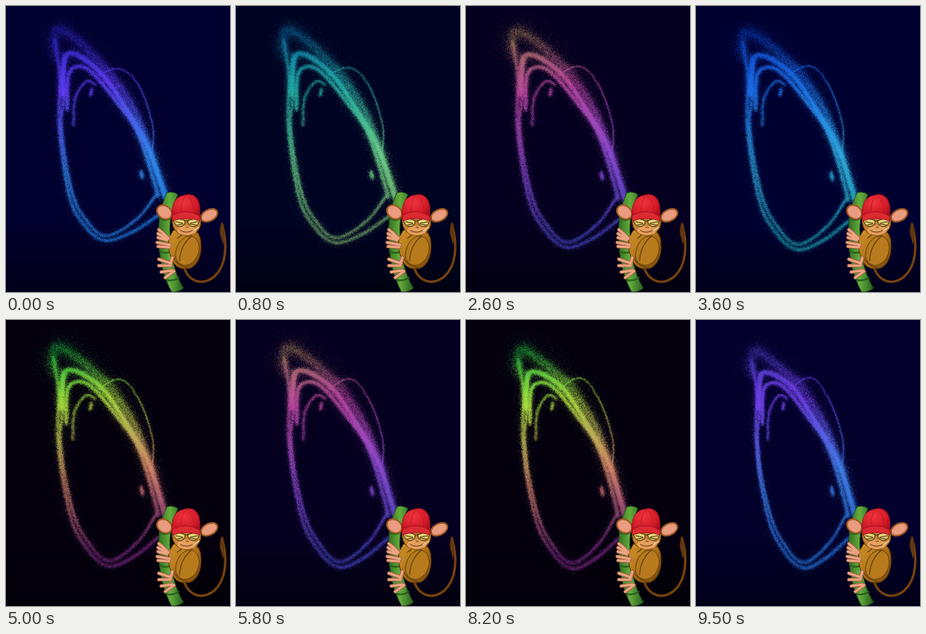
An HTML page with a canvas for the animation above (9600 ms loop, 280 by 358 pixels).

```html
<!DOCTYPE html>
<html lang="en">
<head>
<meta charset="utf-8">
<title>Attractor</title>
<style>
html, body { margin: 0; width: 100%; height: 100%; overflow: hidden; background: #02002c; }
canvas, svg { position: absolute; left: 0; top: 0; width: 280px; height: 358px; display: block; }
</style>
</head>
<body>
<canvas id="stage" width="280" height="358"></canvas>
<svg viewBox="0 0 280 358" stroke-linejoin="round" stroke-linecap="round">
  <defs>
    <linearGradient id="fur" x2="1" y2="1"><stop stop-color="#d39a2c"/><stop offset=".55" stop-color="#aa6c14"/><stop offset="1" stop-color="#70420b"/></linearGradient>
    <linearGradient id="cane"><stop stop-color="#326f20"/><stop offset=".45" stop-color="#65ad3d"/><stop offset="1" stop-color="#235b1c"/></linearGradient>
    <radialGradient id="cap" cx=".4" cy=".3" r=".75"><stop stop-color="#ee343d"/><stop offset=".65" stop-color="#d41b29"/><stop offset="1" stop-color="#a30c1b"/></radialGradient>
    <path id="hands" d="M203 291L196 284L191 280M201 291L190 285M201 293L190 290M205 299L189 296M204 302L190 301M208 315L206 322L191 317M206 325L191 325M208 331L194 333M210 332L199 340"/>
  </defs>
  <path d="M223 329C230 346 246 350 260 339C276 325 277 298 270 273" fill="none" stroke="#77430f" stroke-width="3"/>
  <path d="M270 270Q265 282 269 290L271 299Q276 286 270 270Z" fill="#623711"/>
  <path d="M201 234Q208 231 215 236C207 254 204 269 205 286C205 314 213 340 222 353Q217 358 207 358C197 340 191 316 191 289C190 270 193 251 201 234Z" fill="url(#cane)" stroke="#1b4616" stroke-width=".8"/>
  <path d="M192 266Q199 270 206 266M192 307Q199 311 207 307M201 343Q209 345 216 340" fill="none" stroke="#275c1a" stroke-width="2"/>
  <path d="M209 281C201 292 202 307 208 318C211 328 222 331 231 328C242 323 246 307 243 291Q240 279 228 279Z" fill="url(#fur)" stroke="#55310a"/>
  <path d="M212 315C211 299 221 287 232 288C243 291 244 307 237 317C229 327 217 328 212 315Z" fill="#b77b1d" stroke="#684009"/>
  <path d="M232 288Q218 299 217 319M221 285Q213 294 203 292M208 313Q214 326 229 328" fill="none" stroke="#64400d" stroke-width="1.2"/>
  <path d="M216 286Q213 296 204 294L203 288Q210 287 213 281Z" fill="#c38526"/>
  <use href="#hands" fill="none" stroke="#96503b" stroke-width="4.6"/>
  <use href="#hands" fill="none" stroke="#eba481" stroke-width="3.2"/>
  <g fill="#e99c80" stroke="#a05a24" stroke-width="2">
    <ellipse cx="198" cy="258" rx="10" ry="8" transform="rotate(35 198 258)"/>
    <ellipse cx="254" cy="262" rx="11" ry="7" transform="rotate(-28 254 262)"/>
  </g>
  <path d="M208 264Q206 278 215 284Q227 291 238 283Q246 276 243 263Z" fill="#c68230" stroke="#643b10"/>
  <ellipse cx="226" cy="281" rx="12" ry="6" fill="#e5a05b"/>
  <path d="M218 281Q226 286 235 280M225 277L228 277" fill="none" stroke="#68351c"/>
  <path d="M234 281L241 277" stroke="#e8ddb3" stroke-width="1.4"/>
  <path d="M209 267Q217 265 224 269Q224 276 217 276Q211 276 209 267ZM227 269Q235 265 242 267Q241 276 234 276Q228 276 227 269Z" fill="#e5d677" stroke="#40270c"/>
  <path d="M212 270L221 272M214 274L221 273M230 272L240 270M230 273L238 274M224 269L227 269" stroke="#56370f" stroke-width="1.2"/>
  <path d="M208 266C206 249 211 239 222 237Q234 233 240 243Q244 251 242 267Q225 259 208 266Z" fill="url(#cap)" stroke="#8e101a" stroke-width=".7"/>
  <path d="M208 262Q225 252 242 263L242 269Q226 263 208 269Z" fill="#dc2932" stroke="#9c101c" stroke-width=".8"/>
  <path d="M225 237Q218 245 219 257M226 237Q235 244 235 258" fill="none" stroke="#b91621" stroke-width=".7"/>
  <circle id="glint" cx="206" cy="284" r="2.8" fill="#28c4dc"/>
</svg>
<script>
const W = 280, H = 358, LOOP = 9600, CYCLE = 3200;
const ctx = document.getElementById('stage').getContext('2d');
const glint = document.getElementById('glint');
const image = ctx.createImageData(W, H);
const density = new Float32Array(W * H);
const clamp = (v, lo = 0, hi = 1) => Math.max(lo, Math.min(hi, v));
const mix = (a, b, k) => a + (b - a) * k;

let seed = 7321;
function random() {
  seed = (Math.imul(seed, 1664525) + 1013904223) >>> 0;
  return seed / 4294967296;
}
const gauss = () => Math.sqrt(-2 * Math.log(random() + 1e-9)) * Math.cos(2 * Math.PI * random());

function spline(p, u) {
  const last = p.length / 2 - 1, i = Math.min(last - 1, Math.floor(u * last)), f = u * last - i;
  const at = (n, axis) => p[2 * clamp(n, 0, last) + axis];
  return [0, 1].map(axis => {
    const a = at(i - 1, axis), b = at(i, axis), c = at(i + 1, axis), d = at(i + 2, axis);
    return b + .5 * f * (c - a + f * (2 * a - 5 * b + 4 * c - d + f * (3 * (b - c) + d - a)));
  });
}

// Scatter particles evenly along a curve; the spread changes from end to end.
const clouds = [];
function strand(count, spread0, spread1, ...points) {
  const track = [], lengths = [0], steps = 400;
  for (let i = 0; i <= steps; i++) {
    track.push(spline(points, i / steps));
    if (i) lengths.push(lengths[i - 1] + Math.hypot(track[i][0] - track[i - 1][0], track[i][1] - track[i - 1][1]));
  }
  const even = [];
  for (let i = 0, j = 0; i <= 1000; i++) {
    while (j < steps && lengths[j] < lengths[steps] * i / 1000) j++;
    even.push(track[j]);
  }
  const cloud = new Float32Array(count * 2);
  for (let i = 0; i < count; i++) {
    const u = random(), k = u * 1000, n = Math.min(999, Math.floor(k));
    const spread = mix(spread0, spread1, u) * (random() < .2 ? 2.5 : 1);
    for (let axis = 0; axis < 2; axis++)
      cloud[2 * i + axis] = mix(even[n][axis], even[n + 1][axis], k - n) + gauss() * spread;
  }
  clouds.push(cloud);
}

// Left loop
strand(20000, 1.6, 1.4, 60,40, 67,90, 66,150, 78,235, 96,272, 122,293, 158,282, 192,260);
strand(17000, 1.5, 1.3, 72,60, 72,110, 69,155, 82,232, 101,269, 125,287, 162,267, 188,235);
// Folds and the haze above them
strand(43000, 2.1, 1.8, 70,112, 71,78, 77,59, 98,66, 126,93, 152,132, 176,175, 199,240);
strand(22000, 1.5, 1.6, 76,130, 78,85, 93,75, 112,88, 138,120, 165,160, 190,238);
strand(2600, 1.5, 1.1, 84,150, 86,115, 100,94, 112,99);
strand(27000, 5, 2.2, 62,62, 60,36, 70,29, 105,58, 158,127, 200,238);
// Thin arc and the two bright spots
strand(3000, .8, .7, 112,88, 140,78, 165,98, 183,150, 181,190);
strand(900, 1.6, 1.8, 168,206, 170,215);
strand(550, 1.4, 1.4, 107,103, 105,112);

// Phase, background, then colours from the head to the foot of the shape.
const tone = (phase, ...names) => [phase, names.map(h => [1, 3, 5].map(i => parseInt(h.slice(i, i + 2), 16)))];
const palette = [
  tone(0, '#02002e', '#2c26c4', '#6440ff', '#328aee', '#1e78d8'),
  tone(.11, '#000032', '#0c3cc8', '#1c70ff', '#2aa8ec', '#10a0b4'),
  tone(.3, '#00041c', '#0c8c9c', '#28d090', '#84e064', '#8c9c44'),
  tone(.5, '#04000f', '#1cb444', '#9cf03c', '#e8b45c', '#8a3478'),
  tone(.57, '#04000e', '#1cb83c', '#b4e840', '#d88070', '#70247c'),
  tone(.78, '#06001c', '#b48a40', '#d84c98', '#9a40d0', '#4838ba')
];
palette.push([1, palette[0][1]]);

function coloursAt(phase) {
  const i = palette.findIndex((key, n) => n && phase <= key[0]);
  const [p0, a] = palette[i - 1], [p1, b] = palette[i], k = (phase - p0) / (p1 - p0);
  return a.map((rgb, n) => rgb.map((v, c) => mix(v, b[n][c], k)));
}

function accumulate(u) {
  density.fill(0);
  const sway = -16 * u + 25 * u * u, sink = 17 * Math.sin(u * Math.PI * .6), lift = 7 * u ** .6;
  for (const cloud of clouds) {
    for (let i = 0; i < cloud.length; i += 2) {
      const x = cloud[i], y = cloud[i + 1];
      const left = clamp((190 - x) / 125), low = clamp((y - 190) / 100, 0, 1.1);
      const high = clamp((95 - y) / 50) * clamp((135 - x) / 50);
      const bump = lift * Math.exp(-((x - 145) ** 2) / 500 - ((y - 80) ** 2) / 150);
      const px = Math.round(x + sway * left ** 3 + 9 * u * low * clamp((190 - x) / 60));
      const py = Math.round(y + sink * low + 9 * u * high - bump);
      if (px >= 0 && px < W && py >= 0 && py < H) {
        const hole = Math.exp(-((x - 72) ** 2 + (y - 48) ** 2) / 30);
        density[py * W + px] += 1 - .85 * hole;
      }
    }
  }
}

function paint(phase) {
  const [back, ...stops] = coloursAt(phase), limits = [0, .27, .65, 1], data = image.data;
  for (let y = 0, n = 0; y < H; y++) {
    const shade = 1 - .45 * clamp((y - 270) / 88);
    for (let x = 0; x < W; x++, n++) {
      const glow = 1 - Math.exp(-density[n] * .085);
      const s = clamp((y - 25) / 270 + (x - 120) * .0008, 0, .999);
      const i = s < limits[1] ? 0 : s < limits[2] ? 1 : 2;
      const k = (s - limits[i]) / (limits[i + 1] - limits[i]);
      for (let c = 0; c < 3; c++)
        data[4 * n + c] = mix(back[c] * shade, mix(stops[i][c], stops[i + 1][c], k), glow);
      data[4 * n + 3] = 255;
    }
  }
  ctx.putImageData(image, 0, 0);
}

let shown = -1;
const start = performance.now();
function frame() {
  const t = Math.floor((performance.now() - start) % LOOP / 100) * 100;
  if (t !== shown) {
    shown = t;
    accumulate(t / LOOP);
    paint(t % CYCLE / CYCLE);
    glint.style.opacity = t >= 6600 && t <= 6800 ? 1 : 0;
  }
  requestAnimationFrame(frame);
}
frame();
</script>
</body>
</html>
```
